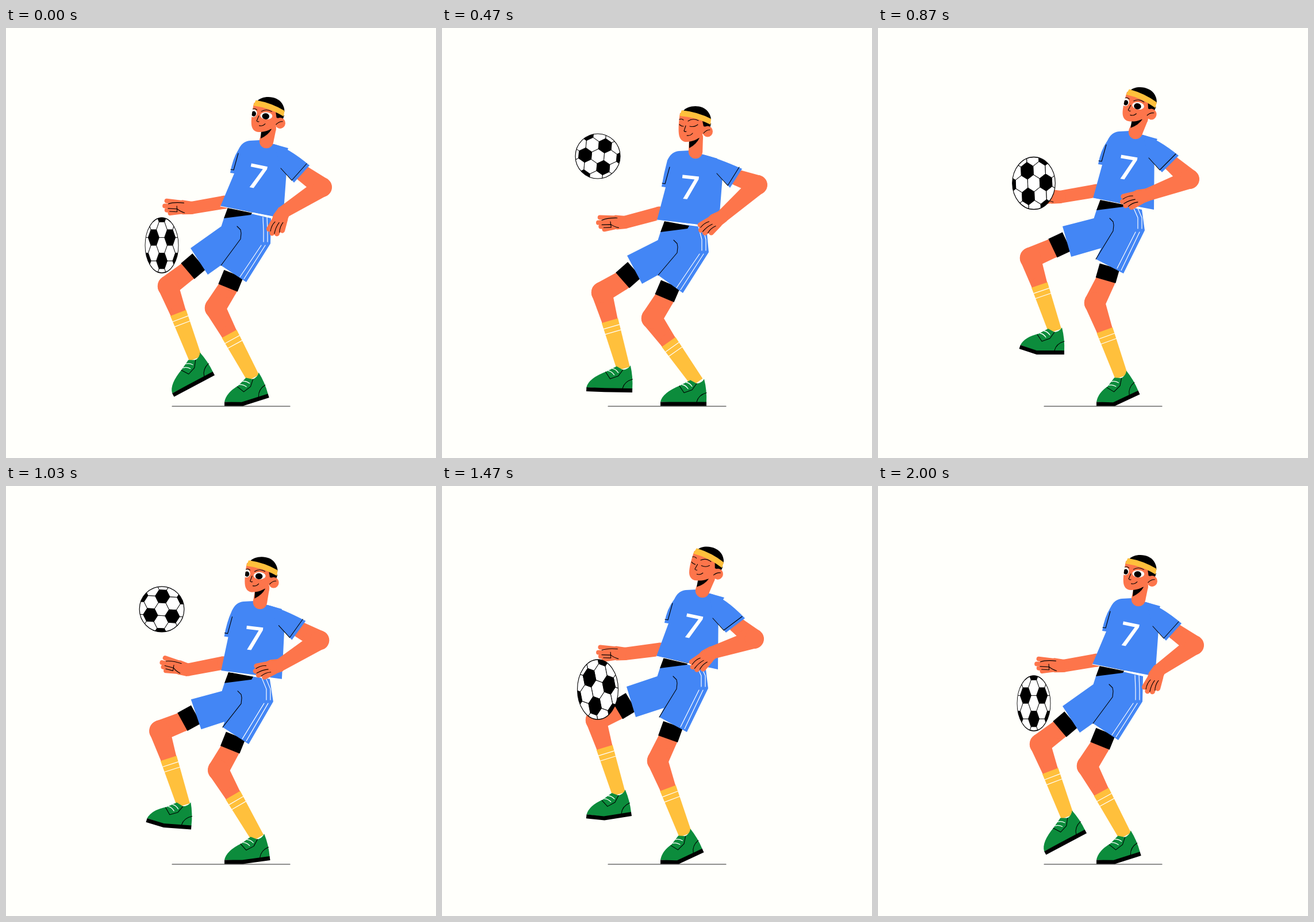
Write an HTML page with a canvas that moves like this. It is 748 by 748 pixels and loops after 2030 ms.

```html
<!DOCTYPE html>
<html lang="en">
<head>
<meta charset="utf-8">
<title>Keepy-uppy</title>
<style>
  html, body { margin: 0; width: 100%; height: 100%; overflow: hidden; background: #fffffb; }
  canvas { display: block; width: 748px; height: 748px; }
</style>
</head>
<body>
<canvas id="stage" width="748" height="748"></canvas>
<script>
const ctx = document.getElementById('stage').getContext('2d');
const LOOP = 2030, STEP = 2000 / 60, CYCLE = 20;
const BG = '#fffffb', SKIN = '#fd754b', BLUE = '#4386f5', GREEN = '#0c8c3c',
      YELLOW = '#ffc03c', INK = '#000', WHITE = '#fff';
const TAU = Math.PI * 2, RAD = Math.PI / 180;

// Poses are keyed at these phases of one bounce
const KEYS = [0, 4, 6, 13, 14, 17];
const BALL_KEYS = [0, 1.7, 4, 6, 11.5, 13, 14, 17];

const torso = {
  hemL:    [[373, 373, 374, 374, 374, 373], [310, 296, 296, 332, 334, 328]],
  hemR:    [[482, 480, 480, 480, 481, 481], [331, 319, 316, 344, 347, 346]],
  neck:    [[453, 453, 448, 440, 441, 448], [197, 182, 181, 211, 215, 212]],
  head:    [[457, 462, 457, 441, 441, 449], [150, 135.5, 133, 162, 166, 164]],
  cuffOut: [[528, 527, 523, 521, 522, 527], [239, 230, 222, 241, 245, 248]],
  cuffIn:  [[501, 494, 494, 499, 501, 504], [269, 255, 251, 275, 278, 280]],
  farCuff: [[390, 387, 383, 379, 382, 388], [252, 238, 237, 272, 276, 272]]
};
const arms = {
  farTop:   [[380, 380, 380, 378, 378, 378], [303, 284, 283, 318, 322, 319]],
  farWrist: [[322, 318, 316, 316, 318, 320], [313, 292, 294, 331, 338, 337]],
  elbow:    [[550, 543, 542, 547, 549, 552], [277, 266, 263, 271, 273, 279]],
  wrist:    [[483, 470, 466, 480, 486, 491], [320, 290, 291, 322, 329, 337]]
};
const legs = {
  farHemA: [[321, 321, 321, 322, 322, 322], [383, 349, 345, 384, 396, 400]],
  farHemB: [[351, 337, 336, 342, 348, 351], [429, 402, 398, 435, 445, 446]],
  fork:    [[375, 386, 388, 377, 377, 374], [412, 386, 383, 422, 429, 430]],
  hemA:    [[374, 378, 379, 376, 376, 373], [413, 402, 402, 427, 430, 430]],
  hemB:    [[418, 426, 427, 420, 419, 418], [442, 428, 427, 458, 461, 459]],
  hip:     [[460, 463, 464, 465, 464, 463], [375, 352, 352, 385, 390, 388]]
};
const joints = {
  farThigh: [[316, 305, 304, 309, 314, 316], [423, 390, 383, 424, 439, 442]],
  farKnee:  [[282, 268, 265, 270, 278, 283], [449, 407, 400, 440, 460, 467]],
  farHeel:  [[363, 330, 324, 323, 331, 350], [604, 574, 568, 613, 634, 633]],
  thigh:    [[386, 393, 396, 387, 387, 385], [452, 440, 439, 467, 470, 467]],
  knee:     [[364, 375, 377, 366, 365, 362], [487, 478, 478, 501, 505, 501]]
};
const turns = {
  head:    [4, 11, 9, 0, 0, 2],
  farHand: [3, 2, 1, 17, -2, -6],
  hand:    [-64, -39, -18, -19, -35, -55],
  farFoot: [-28, -9, 0, 4.5, 1, -16],
  farToe:  [0, 15, 18, 9, 1, 0],
  foot:    [-17.7, -25, -25, -1, 0, -4]
};
const ball = {
  y:    [378, 391, 354, 270, 210.5, 215, 223, 270],
  rx:   [29, 43, 35.5, 37.3, 39, 39, 39, 36.5],
  ry:   [48, 36, 52, 45.5, 39, 39, 39, 41],
  spin: [0, -5, -10, -9, -2, 1, 11, 13]
};

// Periodic cubic through the keys
function curve(vals, p, keys = KEYS) {
  const n = keys.length;
  const time = i => keys[(i + n) % n] + CYCLE * Math.floor(i / n);
  const val = i => vals[(i + n) % n];
  const slope = i => (val(i + 1) - val(i - 1)) / (time(i + 1) - time(i - 1));
  let i = n - 1;
  while (keys[i] > p) i--;
  const h = time(i + 1) - time(i), u = (p - time(i)) / h, v = 1 - u;
  return v * v * (1 + 2 * u) * val(i) + u * u * (3 - 2 * u) * val(i + 1)
    + h * u * v * (v * slope(i) - u * slope(i + 1));
}

const add = (a, x, y) => [a[0] + x, a[1] + y];
const mix = (a, b, t) => [a[0] + (b[0] - a[0]) * t, a[1] + (b[1] - a[1]) * t];
const clamp = (x, lo, hi) => Math.max(lo, Math.min(hi, x));
function spin(a, deg) {
  const c = Math.cos(deg * RAD), s = Math.sin(deg * RAD);
  return [a[0] * c - a[1] * s, a[0] * s + a[1] * c];
}
function side(a, b, r) {
  const d = Math.hypot(b[0] - a[0], b[1] - a[1]);
  return [(a[1] - b[1]) / d * r, (b[0] - a[0]) / d * r];
}

function trace(pts) {
  ctx.beginPath();
  for (const p of pts) ctx.lineTo(p[0], p[1]);
}
function poly(pts, color) {
  trace(pts);
  ctx.fillStyle = color;
  ctx.fill();
}
function line(pts, color = INK, w = 1.1) {
  trace(pts);
  ctx.strokeStyle = color;
  ctx.lineWidth = w;
  ctx.stroke();
}
function oval(x, y, rx, ry, color) {
  ctx.beginPath();
  ctx.ellipse(x, y, rx, ry, 0, 0, TAU);
  ctx.fillStyle = color;
  ctx.fill();
}
function fillPath(d, color) {
  ctx.fillStyle = color;
  ctx.fill(new Path2D(d));
}
function inkPath(d, color = INK, w = 1.1) {
  ctx.strokeStyle = color;
  ctx.lineWidth = w;
  ctx.stroke(new Path2D(d));
}
function placed(at, deg, draw) {
  ctx.save();
  ctx.translate(at[0], at[1]);
  ctx.rotate(deg * RAD);
  draw();
  ctx.restore();
}
function band(a, ra, b, rb, color) {
  const m = side(a, b, ra), n = side(a, b, rb);
  poly([add(a, m[0], m[1]), add(b, n[0], n[1]), add(b, -n[0], -n[1]), add(a, -m[0], -m[1])], color);
}
function limb(a, ra, b, rb, color) {
  band(a, ra, b, rb, color);
  oval(a[0], a[1], ra, ra, color);
  oval(b[0], b[1], rb, rb, color);
}

// Shoe space: heel bottom at 0,0 and the toe pointing left
function shoe(heel, deg, toeBend) {
  const toe = (x, y) => add(spin([x + 48, y], toeBend), -48, 0);
  placed(heel, deg, () => {
    const cap = toe(-77, -23), tip = toe(-80, -7);
    ctx.beginPath();
    ctx.moveTo(0, -6);
    ctx.quadraticCurveTo(1, -27, -4, -47);
    ctx.quadraticCurveTo(-8, -40, -17, -39);
    ctx.lineTo(-28, -45);
    ctx.lineTo(-45, -36);
    ctx.quadraticCurveTo(cap[0], cap[1], tip[0], tip[1]);
    ctx.lineTo(-48, -6);
    ctx.fillStyle = GREEN;
    ctx.fill();
    poly([toe(-80, 0), [-48, 0], [0, 0], [0, -7], [-48, -7], tip], INK);
    inkPath('M-47-35L-39-23L-25-28L-17-39M-17-7Q-14-19 0-23');
    inkPath('M-42-37Q-36-36-32-30M-35-41Q-29-40-25-34', WHITE, 1.3);
  });
  return add(heel, ...spin([-16, -45], deg));
}

function leg(hem, thigh, knee, ankle) {
  const top = mix(knee, ankle, 0.37);
  limb(thigh, 17, knee, 18.3, SKIN);
  limb(knee, 18, top, 14, SKIN);
  band(hem, 18, thigh, 18, INK);
  band(top, 14.7, ankle, 11.5, YELLOW);
  for (const t of [0.45, 0.52]) {
    const c = mix(knee, ankle, t), s = side(knee, ankle, 14);
    line([add(c, s[0], s[1]), add(c, -s[0], -s[1])], WHITE, 1.2);
  }
}

function farHand() {
  fillPath('M2-11L-16-13Q-26-10-26 0Q-25 9-14 12L2 11Z', SKIN);
  inkPath('M-14-8L-43-10M-18-2L-46-1M-16 3L-42 6M-14 7L-36 11', SKIN, 8);
  inkPath('M-40-5Q-30-9-13-8M-40 3L-24 3Q-19 7-11 9M-37 8L-25 8M-25-2L-24 8');
}

function nearHand() {
  fillPath('M4-11L-12-14Q-27-13-28 0Q-24 11-10 12L4 11Z', SKIN);
  inkPath('M-14-8L-38-10M-16-3L-42-2M-14 3L-39 6M-10 8L-30 12', SKIN, 9);
  inkPath('M-40-6Q-30-9-22-6M-41 2Q-30-1-20 1M-35 9Q-26 5-17 7');
}

function head(at, deg, open) {
  const face = 'M-27-18C-29-4-30 8-29 18C-28 28-22 33-14 32C-2 31 8 26 14 16L22-3L0-14Z';
  placed(at, deg, () => {
    fillPath('M-11 30L7 25Q2 36-11 43Z', INK);
    fillPath(face, SKIN);
    fillPath('M12-4L27 0L25 8L14 5Z', INK);
    oval(21, 14, 9, 9.5, SKIN);
    inkPath('M14 17Q19 11 25 11');
    fillPath('M-22-21C-14-32 12-34 22-20Q27-13 27-6Q3-19-22-21Z', INK);
    fillPath('M-24-23Q4-20 27-8L26 2Q2-11-28-13Z', YELLOW);
    if (open > 0.15) {
      ctx.save();
      ctx.clip(new Path2D(face));
      oval(-27, 0, 6.5, 7 * open, WHITE);
      oval(-26, 1, 4, 4.6 * open, INK);
      oval(-4, 3, 10.5, 6.3 * open, WHITE);
      oval(-5, 4, 6.3, 5.3 * open, INK);
      ctx.restore();
    } else {
      inkPath('M-28 2Q-25 5-21 5M-10 5Q-2 7 4 2');
    }
    inkPath('M-28-7Q-24-9-21-6M-13-4Q-5-10 5-5M-17 4L-20 13Q-18 15-16 14M-15 21Q-9 22-5 17');
  });
}

function drawBall(p) {
  const b = name => curve(ball[name], p, BALL_KEYS);
  const R = 39, cell = R * 0.565;
  ctx.save();
  ctx.translate(271, b('y'));
  ctx.scale(b('rx') / R, b('ry') / R);
  ctx.beginPath();
  ctx.arc(0, 0, R, 0, TAU);
  ctx.fillStyle = WHITE;
  ctx.fill();
  ctx.save();
  ctx.clip();
  ctx.rotate((6 * p + b('spin')) * RAD);
  for (let i = -3; i <= 3; i++) {
    for (let j = -3; j <= 3; j++) {
      const x = cell * Math.sqrt(3) / 2 * j, y = cell * (i + j / 2), hex = [];
      for (let k = 0; k <= 6; k++) {
        hex.push(add([x, y], ...spin([cell / Math.sqrt(3), 0], 60 * k)));
      }
      if (((i - j) % 3 + 3) % 3 === 1) poly(hex, INK);
      line(hex, INK, 0.7);
    }
  }
  ctx.restore();
  ctx.beginPath();
  ctx.arc(0, 0, R, 0, TAU);
  ctx.strokeStyle = INK;
  ctx.lineWidth = 1.2;
  ctx.stroke();
  ctx.restore();
}

function shorts(q) {
  const waistL = add(q.hemL, 6, 21), waistR = add(q.hemR, -21, 0);
  poly([add(q.hemL, 14, 4), waistR, q.hip, q.hemB, q.hemA, q.fork, q.farHemB, q.farHemA,
    add(q.hemL, 1.5, 35), waistL], BLUE);
  poly([add(q.hemL, 13, 2), add(q.hemL, 56, 10), add(q.hemL, 53, 15), waistL], INK);
  const fold = add(waistL, 30, 23);
  line([add(fold, -7, -9), add(fold, -1, -3), add(fold, 0, 3), add(fold, -1, 13), q.hemA]);
  for (const k of [0, 7]) {
    line([add(waistR, k - 14, -2), add(q.hip, k - 12, -22), add(q.hip, k - 12, -3)], WHITE, 1.2);
    line([add(q.hip, k - 16, 3), add(q.hemB, k - 11, k / 2 - 9)], WHITE, 1.2);
  }
}

function shirt(q) {
  const n = q.neck, pit = add(q.cuffIn, -23, -25), f = q.farCuff;
  const to = (x, y) => add(n, x, y);
  ctx.beginPath();
  ctx.moveTo(...to(13, 5));
  ctx.lineTo(...to(-10, -2));
  ctx.lineTo(...to(-29, -1));
  ctx.quadraticCurveTo(...to(-42, 0), ...to(-49, 15));
  ctx.quadraticCurveTo(...add(f, 4, -24), ...f);
  ctx.lineTo(...add(f, 7, 1));
  ctx.lineTo(...q.hemL);
  ctx.lineTo(...q.hemR);
  ctx.lineTo(...mix(pit, q.cuffIn, 0.42));
  ctx.lineTo(...pit);
  ctx.lineTo(...to(38, 12));
  ctx.fillStyle = BLUE;
  ctx.fill();
  line([add(f, 1, -6), add(f, 6, -5), add(f, 14, -34)]);
  line([q.hemL, add(q.hemR, -21, -3)], WHITE, 1.2);

  const base = mix(q.hemL, q.hemR, 0.5);
  const lean = Math.atan2(n[0] - base[0], base[1] - n[1]) / RAD;
  placed(add(mix(n, base, 0.5), -3.5, 0), lean, () => {
    ctx.font = '600 58px "Open Sans", "Noto Sans", sans-serif';
    ctx.textAlign = 'center';
    ctx.textBaseline = 'alphabetic';
    ctx.fillStyle = WHITE;
    ctx.fillText('7', 0, 20.5);
  });
}

function sleeve(q) {
  const pit = add(q.cuffIn, -23, -25), n = q.neck;
  ctx.beginPath();
  ctx.moveTo(...pit);
  ctx.lineTo(...add(n, 13, 5));
  ctx.quadraticCurveTo(...add(n, 38, 11), ...q.cuffOut);
  ctx.lineTo(...q.cuffIn);
  ctx.fillStyle = BLUE;
  ctx.fill();
  line([pit, add(q.cuffIn, -4, -4), add(q.cuffOut, -5, -3)]);
}

function draw(frame) {
  const p = frame % CYCLE, bounce = Math.floor(frame / CYCLE);
  const q = {}, a = {};
  for (const group of [torso, arms, legs, joints]) {
    for (const k in group) q[k] = group[k].map(v => curve(v, p));
  }
  for (const k in turns) a[k] = curve(turns[k], p);

  // Small differences between the three bounces
  if (p > 17) q.farHeel[1] += [10, 4, 0][bounce] * Math.sin((p - 17) / 3 * Math.PI);
  q.wrist[0] += 6 * clamp((frame - 53) / 7, 0, 1);
  const blink = Math.min(Math.abs(frame - 14), Math.abs(frame - 44));

  ctx.fillStyle = BG;
  ctx.fillRect(0, 0, 748, 748);
  line([[289, 658], [494, 658]], '#222', 1.1);

  limb(q.farTop, 11.5, q.farWrist, 11, SKIN);
  placed(q.farWrist, a.farHand, farHand);

  const farAnkle = add(q.farHeel, ...spin([-16, -41], a.farFoot));
  leg(mix(q.farHemA, q.farHemB, 0.5), q.farThigh, q.farKnee, farAnkle);
  shoe(q.farHeel, a.farFoot, a.farToe);

  const tilt = Math.min(0, a.foot);
  const heel = add([412, 657.5], ...spin([48, 0], tilt));
  leg(mix(q.hemA, q.hemB, 0.5), q.thigh, q.knee, add(heel, ...spin([-16, -41], tilt)));
  shoe(heel, tilt, -tilt);

  shorts(q);
  shirt(q);
  limb(add(q.head, 1, 24), 12, q.neck, 12.2, SKIN);
  head(q.head, a.head, clamp((blink - 1) / 2, 0, 1));

  limb(mix(q.cuffIn, q.cuffOut, 0.55), 14, q.elbow, 17, SKIN);
  limb(q.elbow, 16.5, q.wrist, 11, SKIN);
  placed(q.wrist, a.hand, nearHand);
  sleeve(q);
  drawBall(p);
}

ctx.lineCap = 'round';
ctx.lineJoin = 'round';
const start = performance.now();
function tick() {
  const t = (performance.now() - start) % LOOP;
  draw(Math.min(60, Math.floor((t + 5) / STEP)));
  requestAnimationFrame(tick);
}
tick();
</script>
</body>
</html>
```
